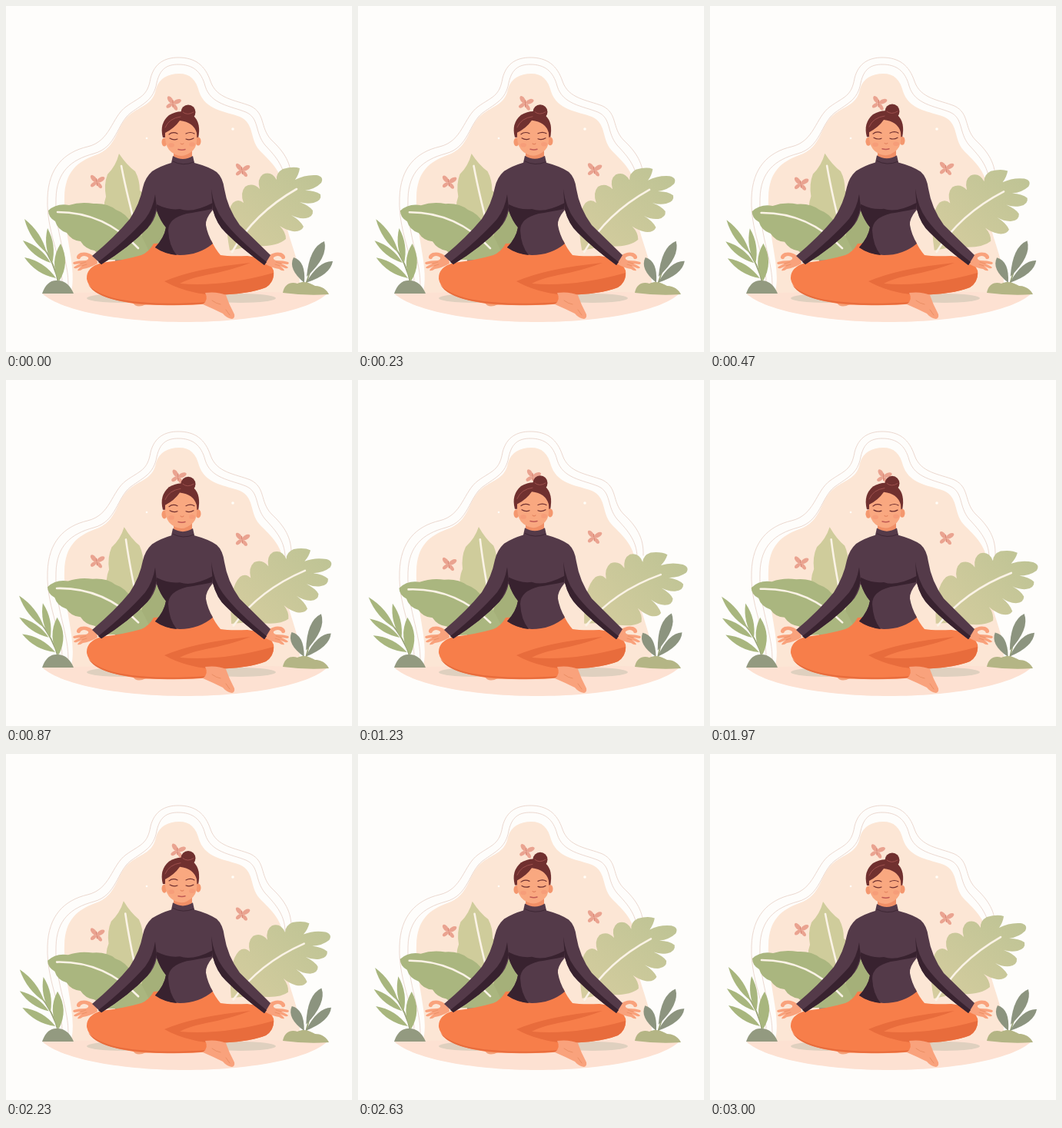
These frames come from a looping animation (450 by 450 pixels, 3.03 s). An HTML page:

```html
<!DOCTYPE html>
<html lang="en">
<head>
<meta charset="utf-8">
<title>Meditation</title>
<style>
html, body { margin: 0; width: 100%; height: 100%; overflow: hidden; background: #fefdfb; }
svg { display: block; width: 100%; height: 100%; }
.line { fill: none; stroke-linecap: round; stroke-linejoin: round; }
.rib { fill: none; stroke: #fbf3e6; stroke-width: 2.6; stroke-linecap: round; }
</style>
</head>
<body>
<svg viewBox="0 0 450 450">
  <defs>
    <g id="fly" fill="#eaa390">
      <ellipse cx="-4.6" cy="-4" rx="5.4" ry="2.9" transform="rotate(42 -4.6 -4)"/>
      <ellipse cx="4.8" cy="-4" rx="5.6" ry="2.9" transform="rotate(-38 4.8 -4)"/>
      <ellipse cx="-3.8" cy="3.6" rx="4.4" ry="2.4" transform="rotate(-48 -3.8 3.6)"/>
      <ellipse cx="4" cy="3.6" rx="4.6" ry="2.4" transform="rotate(44 4 3.6)"/>
      <path class="line" d="M-1-4L1 4" stroke="#d98573" stroke-width="1.3"/>
    </g>
    <g id="hand">
      <path fill="#f9a27c" d="M118 329L112 324Q105 319 97 321Q91 324 92 328Q96 331 97 327Q101 323 107 327Q108 330 103 331Q94 331 88 333Q86 335 89 336L97 335Q90 338 88 340Q89 342 92 341L99 338Q94 341 93 344Q96 345 100 342Q108 341 119 335Z"/>
      <path class="line" stroke="#e88d63" stroke-width=".8" d="M97 335L104 333M99 338L105 336"/>
    </g>
    <linearGradient id="frond" x1="0" y1="1" x2="1" y2="0">
      <stop offset="0" stop-color="#d6cd9f"/><stop offset="1" stop-color="#bdc394"/>
    </linearGradient>
  </defs>

  <!-- backdrop -->
  <g class="line" stroke="#e6cfc4" stroke-width=".8">
    <path d="M72 374C79 338 52 300 54 250C55 210 76 190 106 183C136 176 137 145 156 131C174 118 184 118 188 94C193 74 207 67 224 67C246 67 259 77 266 98C274 121 298 122 318 130C338 140 330 158 345 174C362 190 372 205 371 228"/>
    <path d="M80 374C86 338 63 300 65 250C66 216 84 200 114 192C144 184 144 153 162 139C180 126 192 122 196 100C200 82 209 76 224 76C243 76 254 85 259 104C266 128 292 130 312 138C330 146 323 164 337 181C352 197 364 211 363 234"/>
  </g>
  <path fill="#fce6d5" d="M84 376C94 340 74 300 76 248C77 216 92 203 116 194C146 184 142 157 160 142C176 129 191 129 195 108C199 94 211 88 225 88C240 88 247 96 251 111C259 136 286 137 304 144C324 153 316 172 330 188C346 204 362 218 361 246C358 300 390 330 380 376Z"/>
  <path fill="#fde1d2" d="M47 374Q140 371 233 371T418 374C392 398 312 411 233 411S74 398 47 374Z"/>
  <g fill="#fffdf8"><circle cx="295" cy="160" r="1.8"/><circle cx="183" cy="172" r="1.3"/></g>

  <!-- foliage -->
  <g id="tall">
    <path fill="#cfcc9b" d="M147 192Q157 207 168 215Q174 226 174 240Q186 249 190 262Q199 280 200 330L150 330Q134 302 130 274Q125 262 130 248Q127 232 132 219Q143 208 147 192Z"/>
    <path class="rib" d="M150 208Q158 250 174 307"/>
  </g>
  <path fill="#a5b079" d="M174 310Q178 278 206 258L212 322H158Q162 312 174 310Z"/>
  <path fill="#929584" d="M142 329Q160 316 196 322V332H142Z"/>
  <g id="wide">
    <path fill="#aab67f" d="M55 266Q66 256 82 259Q97 254 114 257Q132 256 143 265Q157 270 164 284Q178 296 190 330L130 330Q122 324 115 318Q103 316 97 306Q85 305 79 295Q67 291 64 280Q55 275 55 266Z"/>
    <path class="rib" d="M67 268Q128 268 172 315"/>
  </g>
  <g id="monstera">
    <path fill="url(#frond)" d="M291 318Q282 272 295 256Q302 250 309 256Q304 243 311 235Q321 229 330 238Q326 225 334 219Q345 214 352 226Q351 217 360 212Q374 208 382 211Q381 219 376 226Q389 219 404 220Q414 222 410 230Q402 238 389 240Q402 240 409 245Q411 253 400 256Q391 258 382 255Q395 260 399 266Q400 274 390 276Q380 277 371 272Q383 279 387 287Q384 294 373 293Q363 291 356 286Q364 294 364 303Q352 314 320 312Z"/>
    <path class="rib" d="M294 320Q322 270 378 238"/>
  </g>
  <g id="sprig" fill="#a8b67e"></g>
  <path fill="#939a80" d="M47 374C51 362 58 356 67 357C77 357 84 364 88 374Z"/>
  <g id="shrub" fill="#8c947f"></g>
  <path fill="#b4b585" d="M360 373C362 362 370 358 379 361C390 356 397 362 402 364C411 364 417 369 420 375Q390 377 360 373Z"/>

  <use id="fly1" href="#fly"/><use id="fly2" href="#fly"/><use id="fly3" href="#fly"/>

  <!-- legs -->
  <g fill="#dfd0bf"><ellipse cx="152" cy="380" rx="47" ry="6"/><ellipse cx="305" cy="380" rx="46" ry="6"/></g>
  <path fill="#f3a078" d="M165 386Q170 394 182 388V384H166Z"/>
  <path fill="#f77e4a" d="M192 309Q186 320 176 324Q152 331 124 334Q104 340 105 355Q108 371 134 380Q162 389 200 389Q240 390 262 387L268 376Q316 375 338 366Q350 358 348 344Q342 328 314 325Q290 326 279 324Q272 316 267 305Z"/>
  <path fill="#e86c3c" d="M107 362Q116 374 145 381Q190 390 262 385V387Q190 392 145 383Q114 376 107 362Z"/>
  <path fill="#e86c3c" d="M206 358Q246 341 318 334Q292 344 260 350Q236 355 226 361Q280 366 348 347Q348 360 338 366Q316 375 268 376Q230 372 206 358Z"/>
  <path fill="#f9a27c" d="M259 373Q275 371 286 376Q290 388 297 401Q298 406 294 407Q287 406 282 400Q270 394 256 388Q264 382 259 373Z"/>
  <path class="line" stroke="#e88d63" stroke-width=".9" d="M286 395L291 402M268 383Q273 387 279 388"/>
  <use href="#hand"/><use href="#hand" transform="matrix(-1 0 0 1 455 0)"/>

  <!-- upper body -->
  <g id="torso">
    <path fill="#f08f66" d="M218 182H242V197Q230 206 218 197Z"/>
    <path fill="#543a49" d="M217 195Q230 203 243 195L245 204Q264 209 274 216Q282 223 284 238Q288 263 304 285L344 324L336 337Q306 315 286 295Q274 284 269 265Q259 277 260 285Q262 297 269 309Q251 324 226 324Q207 323 194 314Q206 301 208 288Q201 280 196 266Q193 280 184 289Q160 314 124 336L112 325Q142 300 161 277Q174 257 178 236Q181 223 190 215Q201 208 215 204Z"/>
    <g fill="#38222f">
      <path d="M196 258Q212 266 226 264Q242 270 269 256L268 264Q248 268 235 270Q211 276 211 292Q212 312 222 324Q205 322 194 314Q206 301 208 288Q200 278 196 266Z"/>
      <path d="M196 262Q192 278 184 289Q160 314 124 336L120 333Q158 303 181 277Q191 264 194 245Z"/>
      <path d="M269 265Q274 284 286 295Q306 315 336 337L339 333Q300 302 282 278Q270 262 267 238Z"/>
    </g>
    <path class="line" stroke="#38222f" stroke-width=".8" d="M217 202Q230 209 244 203"/>
    <circle cx="237" cy="138" r="9.5" fill="#70302f"/>
    <path fill="#70302f" d="M204 171Q199 153 212 142Q229 132 244 143Q254 152 250 172Z"/>
    <g fill="#f4976e"><ellipse cx="206" cy="177" rx="3.5" ry="5.5"/><ellipse cx="250" cy="176" rx="3.5" ry="5.5"/></g>
    <path fill="#f9a880" d="M207 165Q219 159 226 149Q244 151 248 165Q250 181 243 188Q235 195 228 195Q218 194 212 187Q206 179 207 165Z"/>
    <path class="line" stroke="#a25350" stroke-width=".9" d="M207 158Q212 146 227 144M230 138Q236 143 244 138"/>
    <g fill="#f48f70" opacity=".4"><ellipse cx="215" cy="181" rx="4" ry="2.8"/><ellipse cx="242" cy="180" rx="4" ry="2.8"/></g>
    <path class="line" stroke="#70302f" stroke-width="1.2" d="M212 167Q217 163 223 166M234 166Q240 163 245 166M213 172Q218 175 223 173M234 173Q239 175 244 172"/>
    <path class="line" stroke="#e1815d" stroke-width="1" d="M227 179Q229 181 231 179"/>
    <path class="line" stroke="#c05a54" stroke-width="1.5" d="M224 186.500Q229 188 233 186.500"/>
  </g>
</svg>
<script>
const LOOP = 3030;
const $ = id => document.getElementById(id);

// Leaf from base to tip; w = width of its control hull, at = where it is widest
function leaf([bx, by, tx, ty, w], at) {
  const dx = tx - bx, dy = ty - by, len = Math.hypot(dx, dy);
  const mx = bx + dx * at, my = by + dy * at, nx = -dy / len * w, ny = dx / len * w;
  return `<path d="M${bx} ${by}Q${mx + nx} ${my + ny} ${tx} ${ty}Q${mx - nx} ${my - ny} ${bx} ${by}"/>`;
}

function plant(id, stem, at, leaves) {
  $(id).innerHTML = `<path class="line" stroke="#98a276" stroke-width="1.8" d="${stem}"/>` +
    leaves.map(l => leaf(l, at)).join('');
}

plant('sprig', 'M69 364Q64 335 46 310', .5, [
  [53, 321, 24, 277, 9], [58, 334, 22, 305, 9], [65, 354, 24, 327, 10],
  [60, 335, 54, 289, 9], [69, 358, 71, 309, 14]
]);
plant('shrub', 'M389 366Q393 350 403 328', .7, [
  [391, 352, 414, 306, 14], [390, 360, 425, 332, 12], [388, 360, 374, 327, 13]
]);

const sways = [
  ['tall', 4.5, 165, 330], ['wide', -2.3, 185, 310], ['monstera', 11, 300, 335],
  ['sprig', -7.5, 65, 365], ['shrub', -6.5, 388, 364]
];
const flies = [
  ['fly1', 217, 127, 11, -1, 15], ['fly2', 118, 229, 0, 12, 8], ['fly3', 307, 214, 0, -10, 8]
];

function draw(now) {
  const p = (1 - Math.cos(2 * Math.PI * now / LOOP)) / 2;
  const move = (id, value) => $(id).setAttribute('transform', value);
  for (const [id, angle, x, y] of sways) move(id, `rotate(${angle * p} ${x} ${y})`);
  for (const [id, x, y, dx, dy, tilt] of flies)
    move(id, `translate(${x + dx * p} ${y + dy * p}) rotate(${tilt})`);
  move('torso', `translate(0 322) scale(1 ${1 + .024 * p}) translate(0 -322)`);
  requestAnimationFrame(draw);
}
requestAnimationFrame(draw);
</script>
</body>
</html>
```
